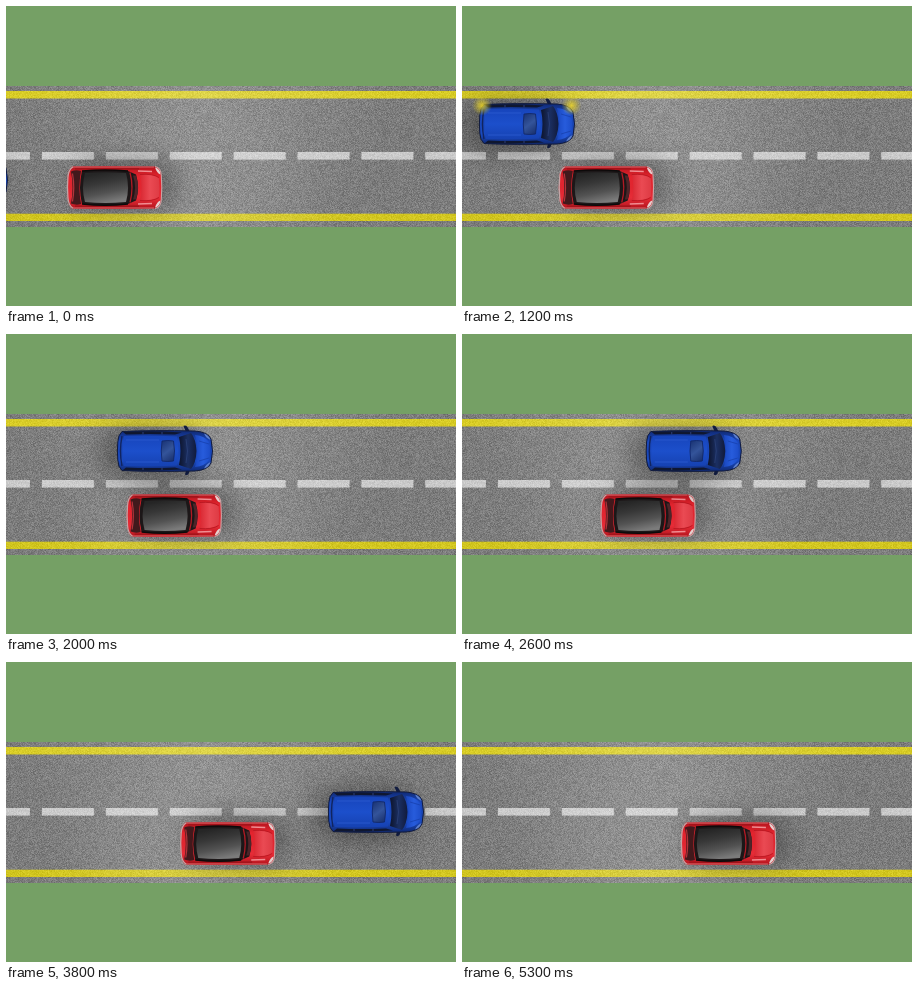
Write an HTML page with a canvas that moves like this. It is 450 by 300 pixels and loops after 5.4 s.

```html
<!DOCTYPE html>
<html lang="en">
<head>
<meta charset="utf-8">
<title>Overtaking</title>
<style>
html, body { margin: 0; width: 100%; height: 100%; overflow: hidden; background: #75a065; }
canvas { display: block; width: 450px; height: 300px; }
</style>
</head>
<body>
<canvas id="stage" width="450" height="300"></canvas>
<script>
const W = 450, H = 300, LOOP = 5400, STEP = 100;
const ctx = document.getElementById('stage').getContext('2d');

// Motion keys: [time, value]
const BLUE_X = [[0, -94], [1200, 17], [2000, 111], [3200, 255.5], [3800, 322], [4600, 410], [5400, 498]];
const BLUE_Y = [[0, 174], [300, 170], [600, 156], [900, 134], [1200, 118], [1500, 117], [2800, 117],
  [3200, 124], [3800, 150], [4200, 171], [4600, 181.5], [5400, 181.5]];

// Cubic through the keys, flat wherever the direction changes
function along(keys, t) {
  const rate = i => (keys[i + 1][1] - keys[i][1]) / (keys[i + 1][0] - keys[i][0]);
  const slope = i => {
    if (i === 0) return rate(0);
    if (i === keys.length - 1) return rate(i - 1);
    const a = rate(i - 1), b = rate(i);
    return a * b <= 0 ? 0 : 2 * a * b / (a + b);
  };
  let i = 0;
  while (i < keys.length - 2 && t >= keys[i + 1][0]) i++;
  const [t0, v0] = keys[i], [t1, v1] = keys[i + 1], d = t1 - t0;
  const u = (t - t0) / d, u2 = u * u, u3 = u2 * u;
  return (2 * u3 - 3 * u2 + 1) * v0 + (u3 - 2 * u2 + u) * d * slope(i)
    + (3 * u2 - 2 * u3) * v1 + (u3 - u2) * d * slope(i + 1);
}

function makeRoad() {
  const c = document.createElement('canvas');
  c.width = W;
  c.height = H;
  const g = c.getContext('2d');
  const box = (color, x, y, w, h) => { g.fillStyle = color; g.fillRect(x, y, w, h); };
  const light = (x, y, r, alpha) => {
    const glow = g.createRadialGradient(x, y, 0, x, y, r);
    glow.addColorStop(0, `rgba(255,255,255,${alpha})`);
    glow.addColorStop(1, 'rgba(255,255,255,0)');
    box(glow, 0, 80, W, 141);
  };
  box('#75a065', 0, 0, W, H);
  box('#7c7c7c', 0, 80, W, 141);
  box('#d8cc26', 0, 85, W, 7.5);
  box('#d2c620', 0, 207.7, W, 7.3);
  for (let x = -28; x < W; x += 63.9) box('#cacaca', x, 146, 52, 7.6);
  light(200, 84, 190, .16);
  light(190, 221, 150, .12);

  const img = g.getImageData(0, 80, W, 141), px = img.data;
  let seed = 7;
  const rnd = () => (seed = (seed * 16807) % 2147483647) / 2147483647;
  for (let i = 0; i < px.length; i += 4) {
    const n = (rnd() + rnd() - 1) * (px[i] > 180 ? 15 : 25);
    for (let k = 0; k < 3; k++) px[i + k] += n;
  }
  g.putImageData(img, 0, 80);
  return c;
}
const road = makeRoad();

function fill(path, color) {
  ctx.fillStyle = color;
  ctx.fill(new Path2D(path));
}

function line(path, color, width = 1) {
  ctx.strokeStyle = color;
  ctx.lineWidth = width;
  ctx.stroke(new Path2D(path));
}

function blend(x0, y0, x1, y1, ...colors) {
  const g = ctx.createLinearGradient(x0, y0, x1, y1);
  colors.forEach((c, i) => g.addColorStop(i / (colors.length - 1), c));
  return g;
}

function body(path, color, blur, dx, dy, alpha) {
  ctx.save();
  ctx.shadowColor = `rgba(0,0,0,${alpha})`;
  ctx.shadowBlur = blur;
  ctx.shadowOffsetX = dx;
  ctx.shadowOffsetY = dy;
  fill(path, color);
  ctx.restore();
}

// Cars face right; origin is the middle of the rear edge
function redCar() {
  const shape = 'M5-21 Q30-22 88-21 Q94-20 94.3-12 Q95.5 0 94.3 12 Q94 20 88 21 Q40 22 5 21 Q1 18 .5 10 Q-.5 0 .5-10 Q1-18 5-21Z';
  body(shape, blend(0, -21, 0, 21, '#b5141d', '#e3242e', '#e02630', '#e62c37', '#b5141d'), 30, 11, -3, .42);
  line('M6-20.5 H87 M6 20.5 H87', '#d9686d', 1.2);
  line('M8-18.6 H72 M8 18.6 H72', '#9c1219', 1.2);
  fill('M4-16 Q9-18 14-16.5 Q11 0 14 16.5 Q9 18 4 16 Q7 0 4-16Z', '#42191c');
  line('M5.5-14 Q8 0 5.5 14', '#b3343b', 1.2);
  fill('M15-16.5 Q38-18.5 61-16.5 L69-13 Q73 0 69 13 L61 16.5 Q38 19 15 16.5 Q11 0 15-16.5Z', '#1c1718');
  fill('M18-14.5 Q38-16 59-14.5 Q63 0 59 14.5 Q38 16.5 18 14.5 Q14 0 18-14.5Z',
    blend(36, -15, 42, 15, '#262626', '#383838', '#525252', '#7b7b7b'));
  line('M15-16.5 Q38-18.5 61-16.5 M15 16.5 Q38 19 61 16.5', '#0c0a0a', 1.4);
  line('M63-15 Q67 0 63 15', '#b01a24', 1.3);
  fill('M66-12 Q70 0 66 12 L69 12 Q73 0 69-12Z', '#4d2529');
  fill('M73-13 Q86-14 92-9 Q93 0 92 9 Q86 14 73 13 Q76 0 73-13Z', blend(73, 0, 93, 0, '#d92731', '#ea4a53', '#dd3a43'));
  line('M73-13 Q86-14 92-10 M73 13 Q86 14 92 10', '#b5151f', .8);
  line('M71-16.5 L85-16 M71 16.5 L85 16', '#f08d92', 1.3);
  fill('M88-20 Q93-19 93.5-13 Q90-14 88-20Z M88 20 Q93 19 93.5 13 Q90 14 88 20Z', '#e6d0cf');
  line('M88-21 Q94-20 94.3-12 Q95.3 0 94.3 12 Q94 20 88 21', '#c9a3a4', 1.1);
  line('M6-20.8 Q1.4-18 .9-10 Q0 0 .9 10 Q1.4 18 6 20.8', '#c4a4a5', 1.3);
}

function blueCar() {
  const shape = 'M5-19.5 Q35-21 78-20 Q91-19 94-12 Q97 0 94 12 Q91 19 78 20 Q35 21 5 19.5 Q1 16 .8 9 Q0 0 .8-9 Q1-16 5-19.5Z';
  fill('M69-19 L66.5-25 Q69-26.5 71-23 L73-19Z M69 19 L68 23.5 Q70 25 71.5 23 L73 19Z', '#14204a');
  body(shape, blend(0, -20, 0, 20, '#102a74', '#1a48bd', '#1846b8', '#1a4abf', '#102a74'), 32, -12, 3, .5);
  line(shape, '#121b3c', 1);
  fill('M6-19 Q34-20.5 65-18.5 L58-16.5 Q32-17.5 9-16.5Z M6 19 Q34 20.5 65 18.5 L58 16.5 Q32 17.5 9 16.5Z', '#0f1730');
  line('M26-19 V-16.5 M45-19 V-16.5 M26 19 V16.5 M45 19 V16.5', '#2c3f78', 1);
  line('M5-15 Q2 0 5 15', '#11245f', 1.4);
  fill('M7-15 Q32-16 60-14.5 Q63 0 60 14.5 Q32 16 7 15 Q4 0 7-15Z', blend(0, -15, 0, 15, '#1745bc', '#1c4fcb', '#1642b2'));
  line('M9-11 H42 M9 11 H42', '#2b5cd0', .8);
  const sunroof = 'M45-10 Q51-11 56.5-10 Q58.5 0 56.5 10 Q51 11 45 10 Q43.5 0 45-10Z';
  fill(sunroof, blend(44, -9, 58, 9, '#1a3475', '#34549a', '#182f6c'));
  line(sunroof, '#12296a', .9);
  fill('M62-14 L74-18 Q79-12 79.5 0 Q79 12 74 18 L62 14 Q65 0 62-14Z', blend(62, 0, 80, 0, '#0d142c', '#1b2f62', '#10193a'));
  line('M69-12 Q72 0 69 12', '#2c4279', .8);
  fill('M78-16 Q88-15 92-9 Q94 0 92 9 Q88 15 78 16 Q83 0 78-16Z', blend(78, 0, 94, 0, '#1947c0', '#275cdc', '#1b4bc6'));
  line('M82-10 L92-7 M82 10 L92 7', '#1741ae', .8);
  fill('M87-17.5 Q92-16 93.5-11 Q89-13 87-17.5Z M87 17.5 Q92 16 93.5 11 Q89 13 87 17.5Z', '#5f80cc');
}

function glow(x, y) {
  const g = ctx.createRadialGradient(x, y, 0, x, y, 10);
  g.addColorStop(0, 'rgba(240,215,35,.85)');
  g.addColorStop(.4, 'rgba(225,205,35,.55)');
  g.addColorStop(1, 'rgba(210,195,40,0)');
  ctx.fillStyle = g;
  ctx.fillRect(x - 10, y - 10, 20, 20);
}

function at(x, y, paint) {
  ctx.save();
  ctx.translate(x, y);
  paint();
  ctx.restore();
}

function blinking(t) {
  const signalling = (t >= 400 && t < 1900) || (t >= 3100 && t < 3750);
  return signalling && t % 400 < 200;
}

function draw(t) {
  ctx.drawImage(road, 0, 0);
  ctx.save();
  ctx.beginPath();
  ctx.rect(0, 80, W, 141);
  ctx.clip();
  at(61 + t * .0298, 181.5, redCar);
  at(along(BLUE_X, t), along(BLUE_Y, t), () => {
    blueCar();
    if (blinking(t)) {
      glow(3, -18.5);
      glow(92.5, -18.5);
    }
  });
  ctx.restore();
}

const start = performance.now();
let shown = -1;
function tick() {
  const t = Math.floor((performance.now() - start) % LOOP / STEP) * STEP;
  if (t !== shown) draw(shown = t);
  requestAnimationFrame(tick);
}
tick();
</script>
</body>
</html>
```
